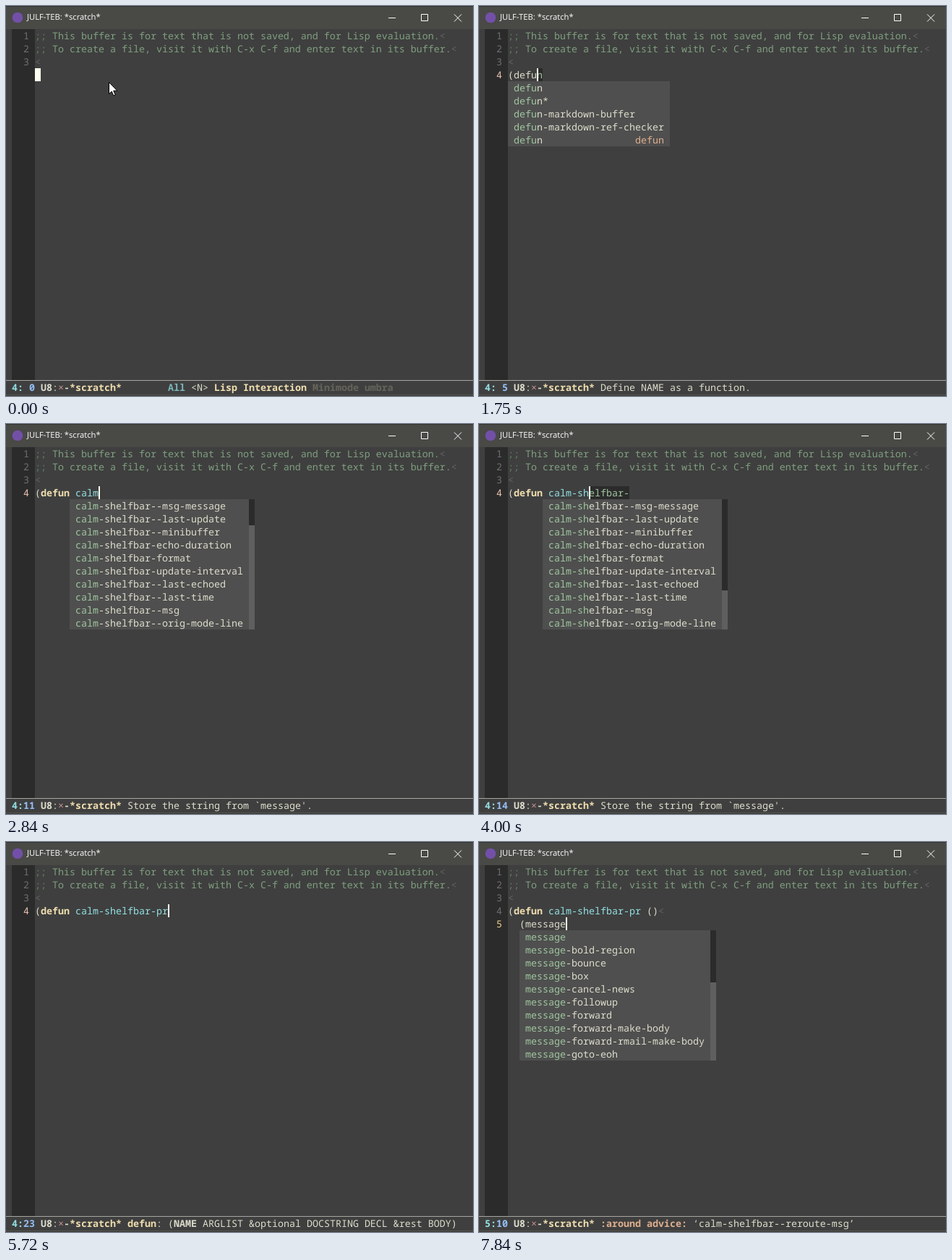
Write an HTML page that moves like this. It is 646 px wide and 539 px high and loops after 8 s.

```html
<!DOCTYPE html>
<html lang="en">
<head>
<meta charset="utf-8">
<title>Editor</title>
<style>
html, body { margin: 0; width: 100%; height: 100%; overflow: hidden; background: #3f3f3f; }
#stage { position: relative; width: 646px; height: 539px; overflow: hidden; background: #3f3f3f;
  color: #dcdccc; font: 13.3333px/18px "Noto Sans Mono", "DejaVu Sans Mono", monospace;
  text-rendering: geometricPrecision; font-variant-ligatures: none; }
#stage div, #stage svg { position: absolute; }
.t { white-space: pre; height: 18px; }
b { font-weight: 700; }
#bar { left: 0; top: 0; width: 646px; height: 32px; background: #494946; box-sizing: border-box; border-top: 1px solid #33342f; }
#title { left: 29px; top: 8px; color: #fff; font: 11.25px/16px "Open Sans", "Noto Sans", sans-serif; white-space: pre; }
#gutter { left: 8px; top: 32px; width: 32px; height: 485px; background: #2b2b2b; }
#rule { left: 0; top: 517px; width: 646px; height: 1px; background: #a5a5a0; }
#edge { left: 0; top: 537px; width: 646px; height: 2px; background: #353535; border-top: 1px solid #55554f; box-sizing: border-box; }
.com { color: #7f9f7f; } .delim { color: #5f7f5f; } .eol { color: #656565; }
.num { color: #6f6f6f; } .num4 { color: #ecc3b3; } .num5 { color: #f0cf8f; }
.key { color: #f0dfaf; } .name { color: #93e0e3; } .green { color: #9fc59f; }
.orange { color: #dfaf8f; } .red { color: #cc9393; } .blue { color: #94bff3; }
.teal { color: #7cb8bb; } .dim { color: #65655c; }
.hint { color: #9fc59f; background: #2b2b2b; }
</style>
</head>
<body>
<div id="stage">
  <div id="bar"></div>
  <div id="title">JULF-TEB: *scratch*</div>
  <svg width="646" height="32" fill="none" stroke="#fff">
    <circle cx="16" cy="16" r="7.3" fill="#7350a8" stroke="none"/>
    <path d="M529 16.5h10M574.5 11.5h9v9h-9zM620 11.5l10 10M630 11.5l-10 10"/>
  </svg>
  <div id="gutter"></div>
  <div id="rule"></div>
  <div id="edge"></div>
  <div id="view"></div>
  <svg id="mouse" style="left:142px;top:104px" width="14" height="21">
    <path d="M.5 1.5v16l3.7-3.5 2.6 5.8 2.4-1-2.5-5.7h5.1z" fill="#fff" stroke="#000"/>
  </svg>
</div>
<script>
const LOOP = 8000, CELL = 8, ROW = 18, LEFT = 40, TOP = 32;
const view = document.getElementById('view'), mouse = document.getElementById('mouse');
const base = 'calm-shelfbar';

const esc = s => s.replace(/&/g, '&amp;').replace(/</g, '&lt;');
const span = (cls, s) => `<span class="${cls}">${esc(s)}</span>`;
const bold = (cls, s) => `<b class="${cls}">${esc(s)}</b>`;
const text = (x, y, html) => `<div class="t" style="left:${x}px;top:${y}px">${html}</div>`;
const box = (x, y, w, h, color) =>
  `<div style="left:${x}px;top:${y}px;width:${w}px;height:${h}px;background:${color}"></div>`;
const lineTop = n => TOP + (n - 1) * ROW;

const modes = state => '        ' + bold('teal', 'All') + esc(` <${state}> `) +
  bold('key', 'Lisp Interaction') + ' ' + bold('dim', 'Minimode umbra');
const usage = bold('key', 'defun') + ': (' + bold('', 'NAME') +
  esc(' ARGLIST &optional DOCSTRING DECL &rest BODY)');
const store = "Store the string from `message'.";
const advice = bold('orange', ':around advice:') + ` ‘${base}--reroute-msg’`;

const suffixed = (stem, list) => list.split(' ').map(s => stem + s);
const defs = { cells: 12, thumb: 2, items: suffixed('def', 'advice alias const custom face group macro subst un var') };
const defuns = { cells: 26, items: ['defun', 'defun*', 'defun-markdown-buffer', 'defun-markdown-ref-checker', 'defun'], note: 'defun' };
const shelf = { cells: 29, thumb: 2, items: suffixed(base,
  '--msg-message --last-update --minibuffer -echo-duration -format -update-interval --last-echoed --last-time --msg --orig-mode-line') };
const shelfNarrow = { ...shelf, thumb: 7 };
const place = { cells: 23, items: [base + '-position'] };
const messages = { cells: 31, thumb: 4, items: ['message', ...suffixed('message-',
  'bold-region bounce box cancel-news followup forward forward-make-body forward-rmail-make-body goto-eoh')] };

// Each step changes only the listed fields; pos is the position in the mode line.
const steps = [
  [0, { four: '', five: '', line: 4, pos: '4: 0', block: true, mouse: true, msg: modes('N'), menu: null, hint: '' }],
  [530, { block: false, msg: modes('I') }],
  [990, { four: '(', mouse: false }],
  [1310, { four: '(d', pos: '4: 2' }],
  [1380, { four: '(de', pos: '4: 3' }],
  [1450, { menu: defs, msg: 'Set the edebug property of SYMBOLS according to a SPEC.' }],
  [1520, { four: '(def', pos: '4: 4' }],
  [1600, { msg: 'Define a piece of advice for FUNCTION (a symbol).' }],
  [1750, { four: '(defu', pos: '4: 5', menu: defuns, hint: 'defun', msg: 'Define NAME as a function.' }],
  [1830, { four: '(defun', pos: '4: 6' }],
  [1920, { four: '(defun ', menu: null, hint: '' }],
  [2000, { pos: '4: 7' }],
  [2460, { four: '(defun c', pos: '4: 8' }],
  [2540, { four: '(defun ca', pos: '4: 9' }],
  [2610, { four: '(defun cal', pos: '4:10' }],
  [2690, { menu: shelf, msg: store }],
  [2840, { four: '(defun calm', pos: '4:11' }],
  [3300, { msg: usage }],
  [3620, { four: '(defun calm-', pos: '4:12', menu: shelfNarrow, hint: base + '-', msg: store }],
  [3710, { msg: usage }],
  [3930, { four: '(defun calm-s', pos: '4:13', msg: store }],
  [4000, { four: '(defun calm-sh', pos: '4:14' }],
  [4090, { four: '(defun calm-she', pos: '4:15' }],
  [4170, { four: '(defun calm-shel', pos: '4:16' }],
  [4560, { four: `(defun ${base}-`, pos: '4:21', hint: '' }],
  [5020, { four: `(defun ${base}-p`, pos: '4:22', menu: place, msg: 'Distance from the frame border.' }],
  [5190, { four: `(defun ${base}-pr`, pos: '4:23', menu: null, msg: '' }],
  [5720, { msg: usage }],
  [5800, { four: `(defun ${base}-pr ` }],
  [6030, { four: `(defun ${base}-pr (`, pos: '4:25' }],
  [6180, { four: `(defun ${base}-pr ()`, pos: '4:26' }],
  [6430, { line: 5, five: '  ', pos: '4: 2' }],
  [6900, { five: '  (', pos: '5: 3' }],
  [7130, { five: '  (m', pos: '5: 4' }],
  [7190, { five: '  (me' }],
  [7360, { five: '  (mes', pos: '5: 6' }],
  [7430, { menu: messages, hint: 'message', msg: advice }],
  [7600, { five: '  (mess', pos: '5: 7' }],
  [7840, { five: '  (message', pos: '5:10' }]
];
let last = {};
const states = steps.map(([at, patch]) => last = { ...last, ...patch, at });

function paintCode(code) {
  const m = /^\((defun) ([^ ]*)(.*)$/.exec(code);
  return m ? '(' + bold('key', m[1]) + ' ' + span('name', m[2]) + m[3] : code;
}

function paintMenu(menu, word, x, y) {
  const { items, cells, thumb, note } = menu, height = items.length * ROW;
  const width = (cells + 2) * CELL;
  let html = box(x, y, width, height, '#4f4f4f');
  items.forEach((item, i) => {
    html += text(x + CELL, y + i * ROW,
      span('green', item.slice(0, word.length)) + item.slice(word.length));
  });
  if (note) html += text(x + (cells + 1 - note.length) * CELL, y + height - ROW, span('orange', note));
  if (thumb) html += box(x + width, y, CELL, height, '#5f5f5f') + box(x + width, y, CELL, thumb * ROW, '#2b2b2b');
  return html;
}

function paint(s) {
  const code = s.line === 4 ? s.four : s.five;
  const word = /[^ (]*$/.exec(code)[0];
  const y = lineTop(s.line), caret = LEFT + code.length * CELL;
  const comment = str => span('delim', ';; ') + span('com', str) + span('eol', '<');
  const number = n => text(24, lineTop(n), span(n === s.line ? 'num' + n : 'num', String(n)));

  let html = text(LEFT, lineTop(1), comment('This buffer is for text that is not saved, and for Lisp evaluation.')) +
    text(LEFT, lineTop(2), comment('To create a file, visit it with C-x C-f and enter text in its buffer.')) +
    text(LEFT, lineTop(3), span('eol', '<')) + number(1) + number(2) + number(3);
  if (s.four) html += number(4);
  if (s.line === 5) html += number(5);
  html += text(LEFT, lineTop(4), paintCode(s.four) + (s.line === 5 ? span('eol', '<') : ''));
  html += text(LEFT, lineTop(5), s.five);
  if (s.hint) html += text(caret, y, span('hint', s.hint.slice(word.length)));
  html += box(caret, y, s.block ? CELL : 2, ROW, '#ffffef');
  if (s.menu) html += paintMenu(s.menu, word, caret - (word.length + 1) * CELL, y + ROW);

  html += text(8, 518, bold('name', s.pos.slice(0, 2)) + bold('blue', s.pos.slice(2)) + ' ' +
    bold('', 'U8') + ':' + span('red', '×') + bold('', '-') + bold('key', '*scratch*') +
    (s.msg.startsWith(' ') ? '' : ' ') + s.msg);
  view.innerHTML = html;
  mouse.style.display = s.mouse ? '' : 'none';
}

let shown;
function tick() {
  const t = performance.now() % LOOP;
  const state = states.findLast(s => s.at <= t);
  if (state !== shown) paint(shown = state);
  requestAnimationFrame(tick);
}
tick();
</script>
</body>
</html>
```
